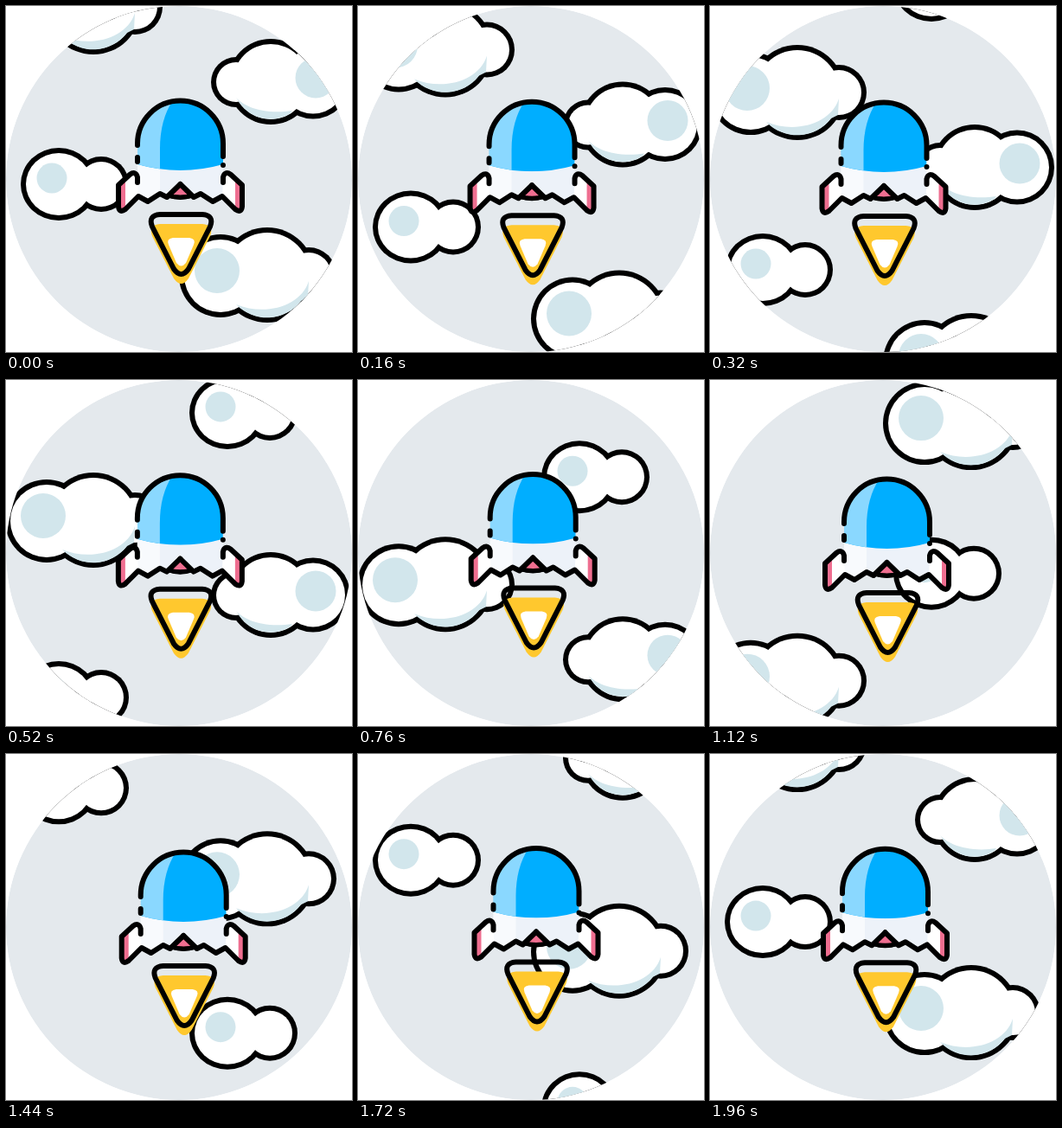
These frames come from a looping animation (400x400 px, 2 s). An HTML page:

```html
<!DOCTYPE html>
<html lang="en">
<head>
<meta charset="utf-8">
<title>Rocket in the clouds</title>
<style>
  html, body { margin: 0; width: 100%; height: 100%; overflow: hidden; background: #fff; }
  svg { display: block; width: 100vw; height: 100vh; }
  .line { fill: none; stroke: #000; stroke-width: 6; stroke-linecap: round; stroke-linejoin: round; }
</style>
</head>
<body>
<svg viewBox="0 0 400 400">
  <defs>
    <clipPath id="sky"><circle cx="200" cy="200" r="200"/></clipPath>
    <clipPath id="dome"><path d="M152 159A49.5 49.5 0 0 1 251 159V183Q201.500 197 152 183Z"/></clipPath>
    <path id="flame" d="M178 241H227Q241 242 236 255L211 304Q202.500 316 194 304L169 255Q164 242 178 241Z"/>
    <g id="fin">
      <path fill="#fff" d="M152 200Q151 189 143 195L130 207V232Q131 240 138 235L153 220Z"/>
      <path fill="#ef6e90" d="M138 199L130 207V232Q131 240 138 235Z"/>
      <path class="line" d="M152 204V198Q150 190 143 195L130 207V232Q131 240 138 235L153 220L164 226L178 217L186 221L201.500 206"/>
    </g>
  </defs>
  <g clip-path="url(#sky)">
    <circle cx="200" cy="200" r="200" fill="#e4e9ed"/>
    <g id="leaving"></g>
    <g id="arriving"></g>
    <g id="rocket">
      <use href="#flame" y="11" fill="#ffc82e"/>
      <path fill="#fff" d="M193 268H212Q220 269 217 276L208 297Q202.500 304 197 297L188 276Q185 269 193 268Z"/>
      <use href="#flame" class="line"/>
      <path fill="#ef6e90" stroke="#000" stroke-width="5" d="M186 219Q201.500 223 217 219L201.500 206Z"/>
      <path class="line" style="stroke-width:5" d="M188 219Q201.500 224 215 219"/>
      <path fill="#edf2f9" d="M152 180H251V220L239 226L225 217L217 221L201.500 206L186 221L178 217L164 226L152 220Z"/>
      <path fill="#f8fafd" d="M152 180H178V217L164 226L152 220Z"/>
      <g clip-path="url(#dome)">
        <rect x="150" y="105" width="104" height="95" fill="#00aeff"/>
        <path fill="#8ad8ff" d="M150 105H196Q178 128 178 165V200H150Z"/>
      </g>
      <use href="#fin"/>
      <use href="#fin" transform="matrix(-1 0 0 1 403 0)"/>
      <path class="line" d="M152 161V159A49.500 49.500 0 0 1 251 159V174M152 175V180M251 184V184.010"/>
    </g>
  </g>
</svg>
<script>
const LOOP = 2000, STEP = 40;
const LEAVE_SPEED = 0.3095, ARRIVE_SPEED = 0.2976;
const PALE = '#d2e6ec';
const $ = id => document.getElementById(id);

// A cloud is a union of outlined ellipses [cx, cy, rx, ry], a pale spot and an optional shade.
function cloud(puffs, spot, shade = '') {
  const ring = (grow, fill) => puffs.map(([x, y, rx, ry = rx]) =>
    `<ellipse cx="${x}" cy="${y}" rx="${rx + grow}" ry="${ry + grow}" fill="${fill}"/>`).join('');
  return ring(3, '#000') + ring(-3, '#fff') +
    `<path fill="${PALE}" d="${shade}"/>` +
    `<circle cx="${spot[0]}" cy="${spot[1]}" r="${spot[2]}" fill="${PALE}"/>`;
}

const place = (art, x, y) => `<g transform="translate(${x} ${y})">${art}</g>`;

const small = cloud([[61, 206, 41, 39], [110, 206, 29]], [53, 199, 17.5]);
const wide = cloud([[266, 88, 26], [306, 87.5, 46.5], [355, 87.5, 40]], [358, 83, 23.5],
  'M264 103C272 116 298 126 331 121L329 124A43.500 43.500 0 0 1 267.500 108Z');
const big = cloud([[248, 312, 45], [302, 311, 52], [350, 311, 29]], [244, 306, 26],
  'M350 318C341 347 300 359 266 345A49.500 49.500 0 0 0 341 341L349 337Z');

const scene = place(small, 0, 0) + place(wide, 0, 0) + place(big, 0, 0) +
  place(big, -201, -310) + place(small, 195, -329);
$('leaving').innerHTML = scene;
$('arriving').innerHTML = scene;

// Rocket drift: [time, x, y]
const drift = [[0, 0, 0], [320, -0.5, 2], [760, 0.7, -0.5], [1120, 3, 5],
  [1440, 3.7, 4], [1720, 4.5, -0.5], [1960, 1, 0.3]];

function knot(i) {
  const n = drift.length, turn = Math.floor(i / n);
  const [t, x, y] = drift[i - turn * n];
  return [t + turn * LOOP, x, y];
}

// Smooth cubic through the drift points, periodic in time.
function driftAt(time, axis) {
  let i = drift.length - 1;
  while (drift[i][0] > time) i--;
  const slope = k => {
    const a = knot(k - 1), b = knot(k + 1);
    return (b[axis] - a[axis]) / (b[0] - a[0]);
  };
  const a = knot(i), b = knot(i + 1), span = b[0] - a[0];
  const u = (time - a[0]) / span, v = 1 - u;
  return v * v * (1 + 2 * u) * a[axis] + u * u * (3 - 2 * u) * b[axis] +
    span * u * v * (v * slope(i) - u * slope(i + 1));
}

const move = (id, x, y) => $(id).setAttribute('transform', `translate(${x.toFixed(2)} ${y.toFixed(2)})`);

function draw(ms) {
  const time = Math.floor((ms % LOOP) / STEP) * STEP;
  move('leaving', 0, LEAVE_SPEED * time);
  move('arriving', 0, ARRIVE_SPEED * (time - LOOP));
  move('rocket', driftAt(time, 1), driftAt(time, 2));
}

let start;
function tick(now) {
  start ??= now;
  draw(now - start);
  requestAnimationFrame(tick);
}
draw(0);
requestAnimationFrame(tick);
</script>
</body>
</html>
```
